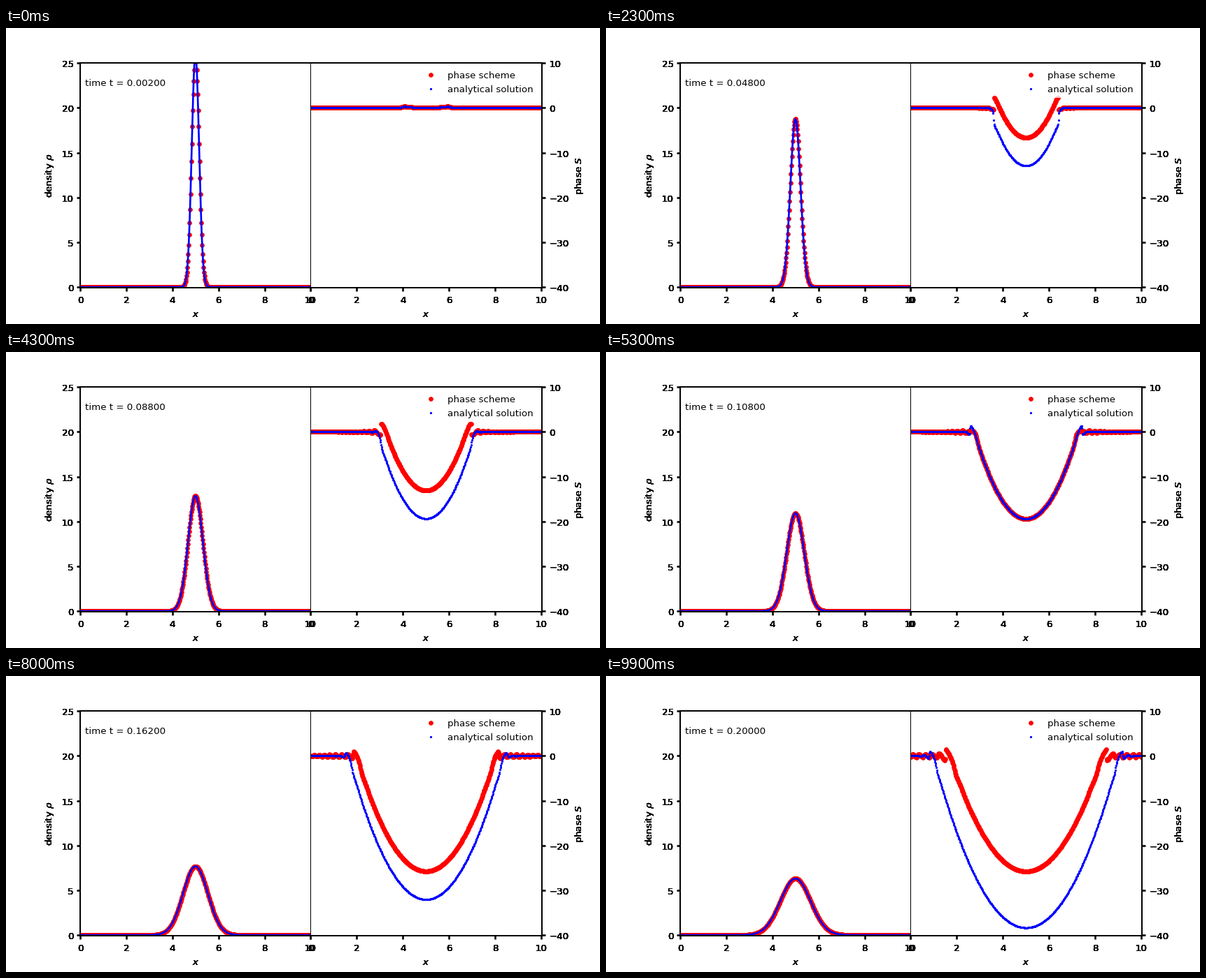
A matplotlib script for the animation above (10000 ms loop, 849x424 px).

```python
import numpy as np
import matplotlib.pyplot as plt
from matplotlib.animation import FuncAnimation
from matplotlib.patches import Rectangle

W, H, DPI = 849, 424, 96
LEFT, MID, RIGHT = 106.1, 435.4, 765.2
TOP, BOTTOM = 50.1, 371.1
FRAMES, DT = 100, 0.002
TAU, PEAK, FLOOR = 0.05, 26.0, 1.2e-4

plt.rcParams.update({"font.family": "DejaVu Sans", "font.size": 10,
                     "mathtext.fontset": "dejavusans"})

x = np.linspace(0, 10, 513)
d = np.abs(x - 5)

# Amplitude of the scheme's spurious background over time
NOISE_T = [0, 0.048, 0.088, 0.108, 0.14, 0.162, 0.2]
NOISE_A = [1.2e-4, 1.45e-4, 2.75e-4, 4.2e-4, 1.22e-3, 7.5e-4, 2.95e-3]


def px(n):
    """Pixels to points."""
    return n * 72 / DPI


def packet(t):
    """Freely spreading Gaussian wave packet."""
    r = t / TAU
    spread = 10 * d**2 / (1 + r**2)
    amp = np.sqrt(PEAK) / (1 + r**2) ** 0.25
    return amp * np.exp(-spread + 1j * (r * spread - 0.5 * np.arctan(r)))


def background(t):
    """Constant floor plus dispersive ripples that fade with wavenumber."""
    k = d / t
    ripple = 0.35 * np.minimum(1, np.exp(-(k - 24) / 8))
    level = np.exp(np.interp(t, NOISE_T, np.log(NOISE_A)))
    return level * (1 + ripple * np.exp(1j * (d**2 / (2 * t) - 1.7)))


def phase(psi):
    return np.unwrap(np.angle(psi))


fig = plt.figure(figsize=(W / DPI, H / DPI), dpi=DPI, facecolor="white")


def panel(x0, x1, ylim, yticks):
    ax = fig.add_axes([x0 / W, 1 - BOTTOM / H, (x1 - x0) / W, (BOTTOM - TOP) / H])
    ax.set(xlim=(0, 10), ylim=ylim, xticks=range(0, 11, 2), yticks=yticks)
    ax.tick_params(length=px(5.5), width=px(2.6), labelbottom=False,
                   labelleft=False)
    ax.spines[:].set_visible(False)
    return ax


def label(x, y, s, **kw):
    # Stacked copies give the heavy, saturated lettering
    for _ in range(10):
        fig.text(x / W, 1 - y / H, s, **kw)


rho_ticks = range(0, 26, 5)
s_ticks = range(-40, 11, 10)
ax1 = panel(LEFT, MID, (0, 25), rho_ticks)
ax2 = panel(MID, RIGHT, (-40, 10), s_ticks)
ax2.yaxis.set_ticks_position("right")
ax2.tick_params(labelright=False)
ax2.spines["left"].set(visible=True, linewidth=px(1))
fig.add_artist(Rectangle((106, H - 372), 660, 322, transform=None, fill=False,
                         edgecolor="black", linewidth=px(2)))

for x0, x1 in ((LEFT, MID), (MID, RIGHT)):
    for v in range(0, 11, 2):
        label(x0 + (x1 - x0) * v / 10, 394, str(v), ha="center")
    label((x0 + x1) / 2, 413.5, "$x$", ha="center")
for i, (a, b) in enumerate(zip(rho_ticks, s_ticks)):
    y = BOTTOM + (TOP - BOTTOM) * i / 5 + 6
    label(96.8, y, str(a), ha="right")
    label(776.6, y, str(b).replace("-", "\u2212"), ha="left")
turned = dict(rotation=90, ha="center", va="center")
label(62.5, 211.5, r"density $\rho$", **turned)
label(819, 212, "phase $S$", **turned)

red = dict(ls="none", marker="o", ms=4, color="red")
blue = dict(ls="none", marker="o", ms=1.4, color="blue")
rho_dots, = ax1.plot([], [], **red)
rho_line, = ax1.plot([], [], color="blue", lw=2)
s_scheme, = ax2.plot([], [], label="phase scheme", **red)
s_exact, = ax2.plot([], [], label="analytical solution", **blue)
ax2.legend(loc="upper right", edgecolor="none", framealpha=0.8)
clock = ax1.text(0.02, 0.898, "", transform=ax1.transAxes)


def update(i):
    t = DT * (i + 1)
    psi = packet(t)
    rho = np.abs(psi) ** 2
    rho_dots.set_data(x, rho)
    rho_line.set_data(x, rho)
    s_scheme.set_data(x, phase(psi + background(t)))
    s_exact.set_data(x, phase(psi + FLOOR))
    clock.set_text(f"time t = {t:.5f}")
    return rho_dots, rho_line, s_scheme, s_exact, clock


anim = FuncAnimation(fig, update, frames=FRAMES, interval=100, repeat=True,
                     repeat_delay=0)
plt.show()
```
